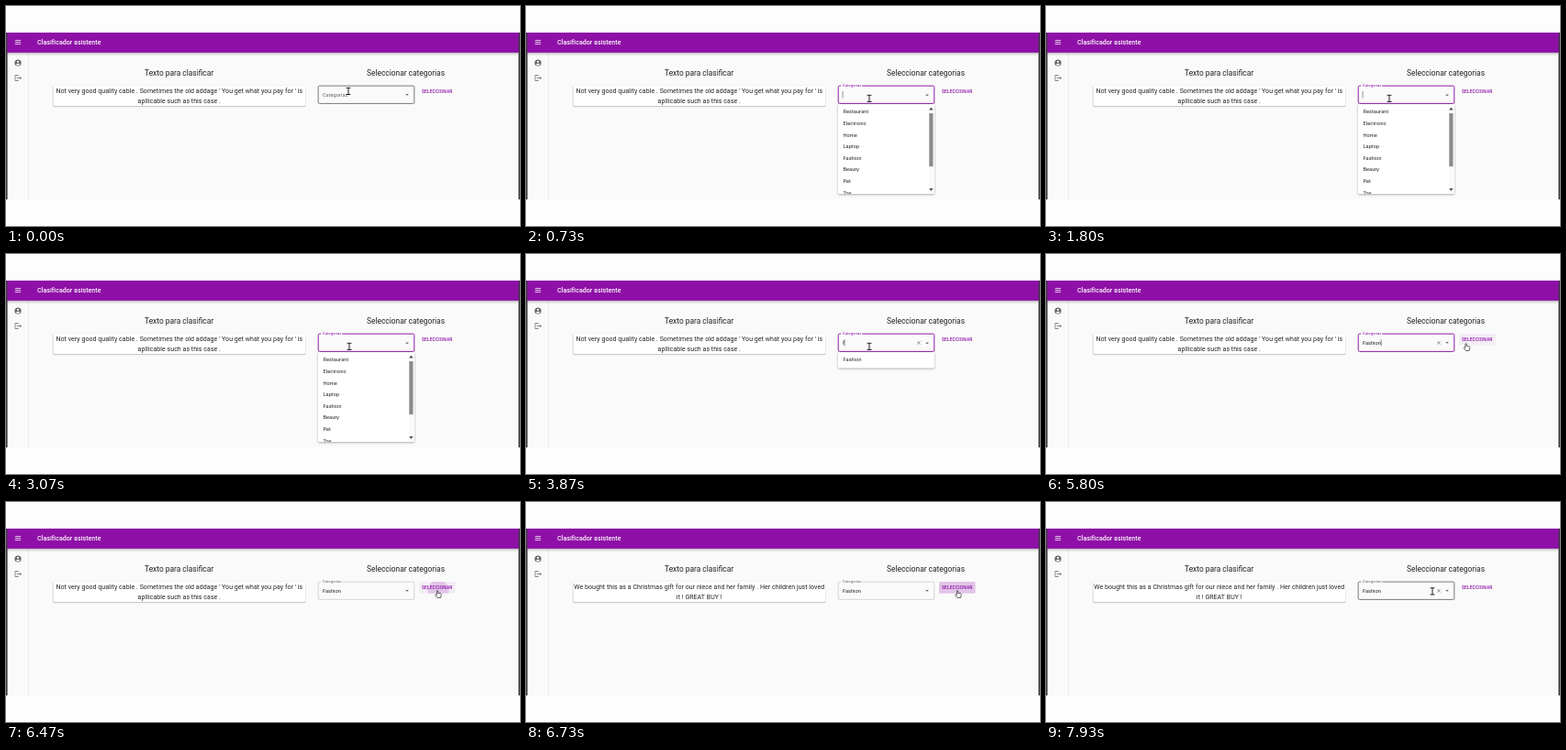
Recreate the animation shown at these times as an HTML page with a canvas. Size 560 px wide and 240 px high, loop 8000 ms.

```html
<!DOCTYPE html>
<html lang="es">
<head>
<meta charset="utf-8">
<title>Clasificador asistente</title>
<style>
html, body { margin: 0; width: 100%; height: 100%; overflow: hidden; background: #fdfdfd; }
canvas { display: block; width: 560px; height: 240px; }
</style>
</head>
<body>
<canvas id="stage"></canvas>
<script>
const W = 560, H = 240, LOOP = 8000;
const canvas = document.getElementById('stage');
const ctx = canvas.getContext('2d');
const dpr = window.devicePixelRatio || 1;
canvas.width = W * dpr;
canvas.height = H * dpr;

const PURPLE = '#8e10a6';
const INK = 'rgba(0,0,0,.87)';
const SOFT = 'rgba(0,0,0,.6)';
const U = 0.35; // one interface unit in stage pixels
const FIELD = { x: 340, y: 87, w: 105, h: 19.6 };
const BUTTON = { x: 450, y: 87, w: 39.6, h: 12.8 };
const OPTIONS = ['Restaurant', 'Electronic', 'Home', 'Laptop', 'Fashion', 'Beauty', 'Pet', 'Toy'];
const REVIEWS = [
  ["Not very good quality cable . Sometimes the old addage ' You get what you pay for ' is",
   'apllicable such as this case .'],
  ['We bought this as a Christmas gift for our niece and her family . Her children just loved',
   'it ! GREAT BUY !']
];

// Moments of the interaction, in ms
const OPEN = 450, TYPE_F = 3870, TYPE_A = 4130, ARROW = 4900, ENTER = 5230,
      CLICK = 6340, REPLY = 6600;
const CARET_ON = [[OPEN, 1000], [1500, 2000], [2570, 3070], [3600, 4660], [5200, 5860]];
const PATH = [
  [0, 373, 93], [130, 373, 93], [400, 374, 101], [5600, 374, 101],
  [5800, 458.5, 101], [5990, 471, 100], [7370, 471, 100], [7620, 452, 101], [7930, 421, 97.5]
];

const clamp = v => Math.max(0, Math.min(1, v));
const ramp = (t, a, b) => clamp((t - a) / (b - a));
const smooth = p => p * p * (3 - 2 * p);
const mix = (a, b, p) => a + (b - a) * p;
const inside = (p, r) => p.x >= r.x && p.x <= r.x + r.w && p.y >= r.y && p.y <= r.y + r.h + 2;

function pointer(t) {
  const i = Math.max(1, PATH.findIndex(k => k[0] >= t));
  const last = PATH[PATH.length - 1];
  if (t >= last[0]) return { x: last[1], y: last[2] };
  const a = PATH[i - 1], b = PATH[i];
  const p = smooth(ramp(t, a[0], b[0]));
  return { x: mix(a[1], b[1], p), y: mix(a[2], b[2], p) };
}

function rect(x, y, w, h, color) {
  ctx.fillStyle = color;
  ctx.fillRect(x, y, w, h);
}

function box(x, y, w, h, r, color) {
  ctx.fillStyle = color;
  ctx.beginPath();
  ctx.roundRect(x, y, w, h, r);
  ctx.fill();
}

function paper(x, y, w, h, blur, drop, alpha) {
  ctx.save();
  ctx.shadowColor = `rgba(0,0,0,${alpha})`;
  ctx.shadowBlur = blur * dpr;
  ctx.shadowOffsetY = drop * dpr;
  box(x, y, w, h, 1.4, '#fff');
  ctx.restore();
}

function text(str, x, y, size, color, { weight = 400, align = 'left', space = 0 } = {}) {
  ctx.font = `${weight} ${size}px Roboto, Arial, sans-serif`;
  ctx.letterSpacing = space * size + 'px';
  ctx.textAlign = align;
  ctx.fillStyle = color;
  ctx.fillText(str, x, y);
  return ctx.measureText(str).width;
}

function line(points, color, width) {
  ctx.strokeStyle = color;
  ctx.lineWidth = width;
  ctx.beginPath();
  points.forEach(([x, y], i) => i ? ctx.lineTo(x, y) : ctx.moveTo(x, y));
  ctx.stroke();
}

function triangle(x, y, w, h, color) {
  ctx.fillStyle = color;
  ctx.beginPath();
  ctx.moveTo(x - w / 2, y - h / 2);
  ctx.lineTo(x + w / 2, y - h / 2);
  ctx.lineTo(x, y + h / 2);
  ctx.fill();
}

function disc(x, y, r, color) {
  ctx.fillStyle = color;
  ctx.beginPath();
  ctx.arc(x, y, r, 0, 7);
  ctx.fill();
}

function accountIcon(x, y) {
  const ink = '#686868';
  disc(x, y, 3.6, ink);
  disc(x, y - 1.2, 1.15, '#fafafa');
  ctx.fillStyle = '#fafafa';
  ctx.beginPath();
  ctx.ellipse(x, y + 1.7, 2.1, 1, 0, 0, 7);
  ctx.fill();
}

function exitIcon(x, y) {
  const ink = '#686868';
  line([[x + 0.2, y - 1.8], [x + 0.2, y - 3], [x - 3, y - 3], [x - 3, y + 3], [x + 0.2, y + 3], [x + 0.2, y + 1.8]], ink, 0.75);
  line([[x - 1.2, y], [x + 3.4, y]], ink, 0.75);
  line([[x + 1.9, y - 1.6], [x + 3.5, y], [x + 1.9, y + 1.6]], ink, 0.75);
}

function frame() {
  rect(0, 0, W, H, '#fdfdfd');
  rect(0, 29, W, 182, '#fafafa');
  ctx.save();
  ctx.beginPath();
  ctx.rect(0, 29, W, 182);
  ctx.clip();
  rect(24.5, 51, 0.5, 160, '#dcdcdc');
  ctx.shadowColor = 'rgba(0,0,0,.3)';
  ctx.shadowBlur = 3 * dpr;
  ctx.shadowOffsetY = dpr;
  rect(0, 29, W, 21.6, PURPLE);
  ctx.restore();
  rect(0, 29, 1.6, 182, '#3d3940');
  rect(558.4, 29, 1.6, 182, '#3d3940');
  rect(1.6, 29, 556.8, 21.6, PURPLE);

  for (const dy of [-2.1, 0, 2.1]) rect(9.8, 39.2 + dy, 6.3, 0.75, '#fff');
  text('Clasificador asistente', 34, 41.7, 20 * U, '#fff', { weight: 500, space: 0.0075 });
  accountIcon(13, 62);
  exitIcon(13, 78.5);

  text('Texto para clasificar', 188.6, 75.6, 24 * U, INK, { align: 'center' });
  text('Seleccionar categorias', 435.5, 75.6, 24 * U, INK, { align: 'center' });
}

function review(t) {
  paper(51.5, 87, 274.5, 22, 1.2, 0.6, 0.4);
  REVIEWS[t < REPLY ? 0 : 1].forEach((row, i) =>
    text(row, 188.8, 95 + i * 11.2, 20 * U, INK, { align: 'center', space: 0.0075 }));
}

function select(t, mouse) {
  const { x, y, w, h } = FIELD;
  const focused = t >= OPEN && t < CLICK;
  const hover = inside(mouse, FIELD);
  const float = smooth(ramp(t, OPEN, OPEN + 200));
  const value = t < TYPE_F ? '' : t < TYPE_A ? 'f' : t < ENTER ? 'fa' : 'Fashion';
  const edge = focused ? PURPLE : hover ? INK : 'rgba(0,0,0,.26)';

  ctx.save();
  ctx.beginPath();
  ctx.rect(x - 2, y - 2, w + 4, h + 4);
  if (float > 0) ctx.rect(x + 3.2, y - 1.5, 23 * float, 3);
  ctx.clip('evenodd');
  ctx.strokeStyle = edge;
  ctx.lineWidth = focused ? 0.95 : 0.6;
  ctx.beginPath();
  ctx.roundRect(x + 0.2, y + 0.1, w - 0.4, h - 0.3, 1.4);
  ctx.stroke();
  ctx.restore();

  text('Categorias', x + 4.9, mix(98.8, 88.2, float), 16 * U * mix(1, 0.75, float),
    focused ? PURPLE : SOFT, { space: 0.00938 });
  const width = value ? text(value, x + 4.9, 98.8, 16 * U, INK, { space: 0.00938 }) : 0;
  if (CARET_ON.some(([a, b]) => t >= a && t < b)) rect(x + 4.8 + width, 93.2, 0.5, 7.2, INK);

  if (value && (hover || focused)) {
    line([[426.2, 95], [429.8, 98.6]], SOFT, 0.65);
    line([[429.8, 95], [426.2, 98.6]], SOFT, 0.65);
  }
  const open = t >= OPEN && t < ENTER;
  if (open) {
    ctx.save();
    ctx.translate(437, 96.9);
    ctx.rotate(Math.PI * ramp(t, OPEN, OPEN + 1));
    triangle(0, 0, 3.7, 1.9, SOFT);
    ctx.restore();
    menu(t);
  } else {
    triangle(437, 96.9, 3.7, 1.9, SOFT);
  }
}

function menu(t) {
  const full = t < TYPE_F;
  const top = 107, height = full ? 98 : 17.4;
  paper(FIELD.x, top, FIELD.w, height, 2.4, 0.8, 0.36);
  ctx.save();
  ctx.beginPath();
  ctx.rect(FIELD.x, top, FIELD.w, height);
  ctx.clip();
  if (t >= ARROW) rect(FIELD.x, 109.2, FIELD.w, 12.6, 'rgba(0,0,0,.05)');
  (full ? OPTIONS : ['Fashion']).forEach((name, i) =>
    text(name, 345.5, 117.4 + i * 12.6, 16 * U, INK, { space: 0.00938 }));
  if (full) {
    rect(438.8, top, 5.4, height, '#fafafa');
    box(439.3, 117, 4.2, 58, 0.4, '#8b8b8b');
    triangle(441.4, 112, 4.6, -2.8, '#505050');
    triangle(441.4, 200.3, 4.6, 2.8, '#505050');
  }
  ctx.restore();
}

function button(t, mouse) {
  const { x, y, w, h } = BUTTON;
  if (inside(mouse, BUTTON)) box(x, y, w, h, 1.4, 'rgba(142,16,166,.05)');
  const grow = smooth(ramp(t, CLICK, CLICK + 350));
  const fade = 1 - ramp(t, 6760, 7130);
  if (grow > 0 && fade > 0) {
    ctx.save();
    ctx.beginPath();
    ctx.roundRect(x, y, w, h, 1.4);
    ctx.clip();
    disc(471, 97, 4 + 24 * grow, `rgba(142,16,166,${0.18 * fade})`);
    ctx.restore();
  }
  text('SELECCIONAR', 452.9, 94.9, 14 * U, PURPLE, { weight: 500, space: 0.02857 });
}

function beam(x, y) {
  const shape = [[[x - 2.4, y - 3.7], [x + 2.4, y - 3.7]], [[x, y - 3.7], [x, y + 3.5]], [[x - 2.4, y + 3.5], [x + 2.4, y + 3.5]]];
  shape.forEach(s => line(s, 'rgba(255,255,255,.8)', 1.8));
  shape.forEach(s => line(s, '#111', 0.95));
}

function hand(x, y) {
  ctx.save();
  ctx.translate(x, y);
  ctx.beginPath();
  ctx.moveTo(-1.6, 1);
  ctx.lineTo(-1.6, -3);
  ctx.quadraticCurveTo(-0.9, -4.2, -0.2, -3);
  ctx.lineTo(-0.2, -0.7);
  ctx.lineTo(2.6, -0.1);
  ctx.quadraticCurveTo(3.5, 0.3, 3.3, 1.4);
  ctx.lineTo(2.6, 4.4);
  ctx.lineTo(-1.2, 4.4);
  ctx.lineTo(-3.3, 1.4);
  ctx.quadraticCurveTo(-3.1, 0.2, -1.6, 1.2);
  ctx.closePath();
  ctx.fillStyle = '#fff';
  ctx.fill();
  ctx.strokeStyle = '#222';
  ctx.lineWidth = 0.7;
  ctx.stroke();
  ctx.restore();
}

function arrow(x, y) {
  ctx.beginPath();
  [[0, 0], [0, 7], [1.7, 5.4], [2.9, 8], [4, 7.5], [2.8, 5], [5, 5]].forEach(([dx, dy]) =>
    ctx.lineTo(x + dx, y - 3 + dy));
  ctx.closePath();
  ctx.fillStyle = '#111';
  ctx.fill();
  ctx.strokeStyle = '#fff';
  ctx.lineWidth = 0.5;
  ctx.stroke();
}

function draw(t) {
  ctx.setTransform(dpr, 0, 0, dpr, 0, 0);
  const mouse = pointer(t);
  frame();
  review(t);
  select(t, mouse);
  button(t, mouse);
  const shape = inside(mouse, FIELD) ? beam : inside(mouse, BUTTON) ? hand : arrow;
  shape(mouse.x, mouse.y);
}

const start = performance.now();
function tick() {
  draw((performance.now() - start) % LOOP);
  requestAnimationFrame(tick);
}
tick();
</script>
</body>
</html>
```
